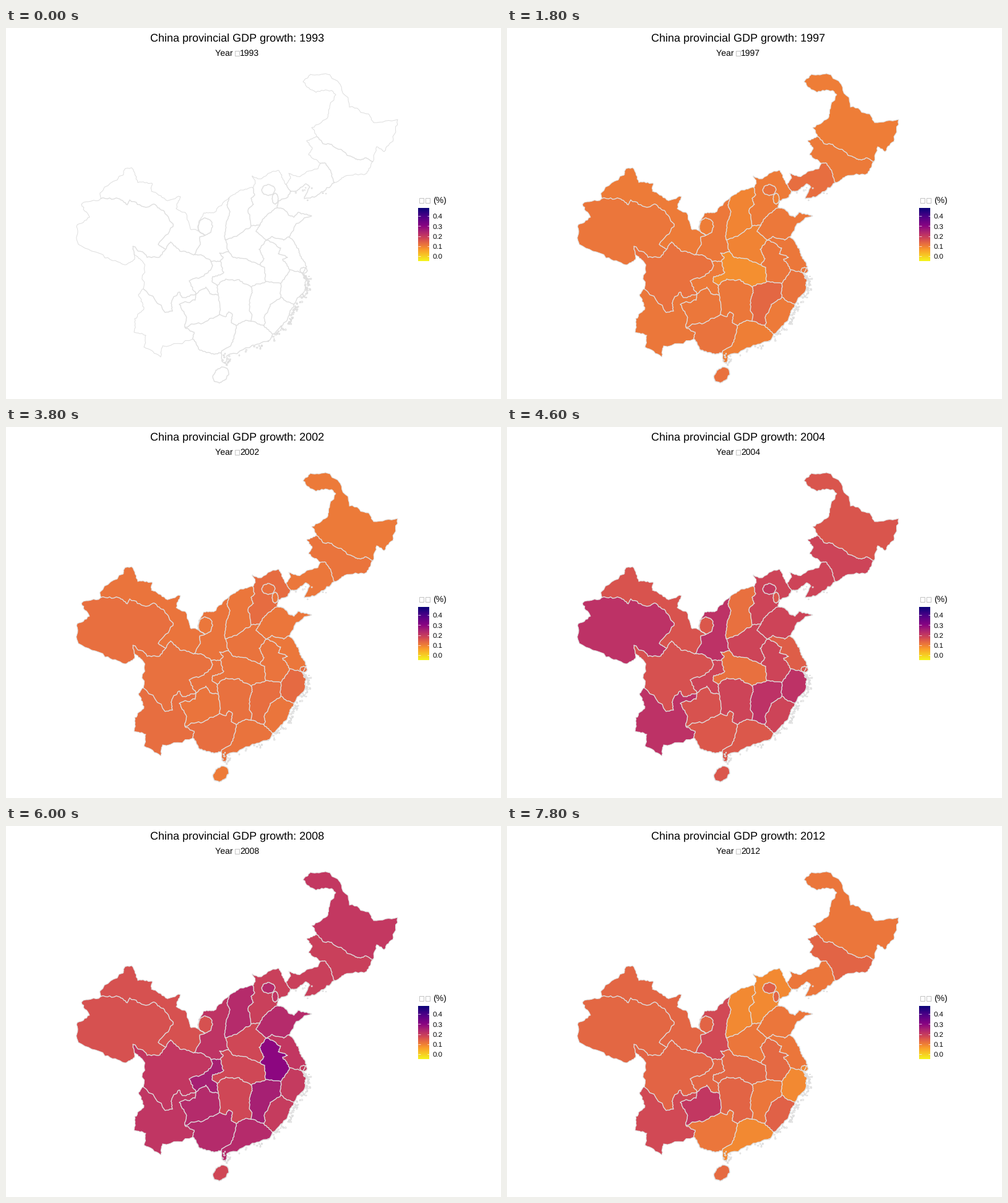
Write a matplotlib script that moves like this. It is 800 by 600 pixels and loops after 8000 ms.

```python
import numpy as np
import matplotlib.pyplot as plt
from matplotlib.animation import FuncAnimation
from matplotlib.collections import LineCollection, PolyCollection
from matplotlib.colors import LinearSegmentedColormap
from matplotlib.patches import Rectangle

W, H, DPI = 800, 600, 100
FRAMES, STEP_MS = 40, 200
BORDER = "#dedede"
plt.rcParams.update({"font.family": "Liberation Sans", "text.hinting": "none",
                     "text.kerning_factor": 6})
rng = np.random.default_rng(7)

# Points where borders meet.
NODES = dict(
    a=(503, 176), b=(593, 216), c=(508, 219), d=(531, 250), e=(452, 253), f=(461, 264), g=(399, 258),
    h=(438, 291), i=(411, 318), j=(396, 320), k=(361, 274), l=(354, 342), m=(310, 328), n=(303, 367),
    o=(331, 377), p=(346, 377), q=(360, 362), r=(153, 276), s=(258, 358), t=(207, 366), u=(222, 422),
    v=(307, 430), w=(343, 432), x=(341, 416), y=(302, 503), z=(289, 484), A=(345, 463), B=(372, 481),
    C=(348, 525), D=(396, 419), E=(396, 474), F=(410, 383), G=(420, 410), H=(421, 343), I=(459, 391),
    J=(457, 338), K=(444, 413), L=(479, 397), M=(466, 446), N=(444, 435), O=(417, 482), P=(431, 495))

# Each border: the two sides, its end nodes, then the bends between as x, y.
BORDERS = [
    ("HL out", "ab", 494, 161, 519, 146, 523, 130, 533, 108, 526, 101, 501, 104, 480, 87, 492, 75, 520, 75,
     540, 91, 555, 128, 586, 139, 594, 153, 633, 148, 626, 180, 611, 200, 599, 192),
    ("HL JL", "ab", 512, 187, 526, 188, 556, 207, 568, 213, 582, 210),
    ("JL out", "ac", 486, 182, 495, 195, 489, 205),
    ("JL LN", "cd", 515, 218, 525, 232),
    ("JL out", "db", 547, 240, 583, 235),
    ("LN out", "ce", 503, 228, 470, 240, 457, 235, 460, 243),
    ("LN HE", "ef"),
    ("LN sea", "fd", 468, 264, 484, 252, 491, 257, 482, 276, 507, 268),
    ("HE out", "eg", 447, 243, 440, 230, 408, 244, 398, 239, 403, 251),
    ("HE sea", "fh", 455, 274, 440, 279),
    ("HE SD", "hi", 418, 306),
    ("HE SX", "gj", 402, 270, 396, 276, 400, 285, 392, 292),
    ("HE HA", "ji"),
    ("SX out", "gk", 379, 262),
    ("SX SN", "kl", 357, 286, 362, 297, 355, 320),
    ("SX HA", "lj", 375, 335),
    ("SN out", "km", 335, 299, 320, 299, 312, 312),
    ("SN GS", "mn", 322, 335, 313, 338, 314, 347),
    ("SN SC", "no", 312, 367),
    ("SN CQ", "op"),
    ("SN HB", "pq", 351, 371, 345, 364),
    ("SN HA", "ql"),
    ("GS out", "rm", 152, 267, 189, 238, 192, 228, 203, 226, 213, 250, 236, 251, 235, 264, 258, 278,
     282, 273, 275, 292, 291, 300, 298, 325),
    ("GS QH", "rs", 182, 276, 196, 286, 200, 278, 226, 290, 240, 285, 256, 297, 270, 321, 246, 350),
    ("GS SC", "sn", 266, 346, 281, 361),
    ("QH out", "rt", 122, 285, 135, 306, 114, 321, 117, 350, 160, 372, 192, 383, 208, 374),
    ("QH SC", "ts", 205, 353, 228, 371, 247, 371),
    ("SC out", "tu", 221, 378),
    ("SC YN", "uv", 257, 460, 269, 458, 268, 441, 280, 427, 285, 436),
    ("SC CQ", "ov", 334, 384, 320, 401, 296, 409),
    ("CQ GZ", "vw", 323, 419, 330, 430),
    ("CQ HN", "wx"),
    ("CQ HB", "xp", 333, 410, 334, 402, 352, 395),
    ("YN out", "uy", 214, 432, 223, 452, 208, 470, 207, 492, 226, 497, 223, 516, 250, 532, 253, 514),
    ("YN GZ", "vz", 306, 440, 280, 447, 291, 466),
    ("YN GX", "zy", 304, 492),
    ("GX GZ", "zA", 319, 477, 337, 468),
    ("GZ HN", "wA"),
    ("GX HN", "AB", 355, 467, 360, 459, 366, 463, 364, 476),
    ("GX GD", "BC", 371, 492, 364, 512),
    ("GX sea", "yC", 311, 519, 332, 527),
    ("HN HB", "xD", 355, 406, 377, 407),
    ("HN JX", "DE", 398, 428, 393, 447),
    ("HN GD", "BE", 390, 473),
    ("HB HA", "qF", 367, 371, 390, 374),
    ("HB AH", "FG", 418, 387),
    ("HB JX", "DG"),
    ("HA AH", "FH", 417, 373, 409, 358),
    ("HA SD", "iH", 404, 329),
    ("AH JS", "HI", 444, 356, 440, 365, 455, 371, 447, 374),
    ("SD JS", "HJ", 430, 337, 449, 343),
    ("AH ZJ", "IK", 455, 399),
    ("AH JX", "GK"),
    ("SD sea", "hJ", 447, 292, 465, 306, 472, 298, 494, 304, 467, 320),
    ("JS sea", "JL", 473, 357, 475, 368, 486, 386),
    ("JS ZJ", "IL"),
    ("ZJ sea", "LM", 485, 404, 483, 424),
    ("ZJ FJ", "MN", 455, 443),
    ("ZJ JX", "KN"),
    ("JX FJ", "NO", 427, 447, 418, 466),
    ("JX GD", "EO", 402, 475),
    ("FJ GD", "OP"),
    ("FJ sea", "MP", 459, 460, 452, 475),
    ("GD sea", "PC", 427, 504, 398, 513, 357, 530, 355, 543, 349, 539),
]
# Small regions: centre, radii, tilt.
BLOBS = {"NX": (322, 321, 12, 14, 0), "BJ": (424, 262, 11, 9, 0), "TJ": (435, 276, 5, 9, 0),
         "SH": (481, 392, 6, 5, 0), "HI": (347, 561, 15, 11, -0.8)}

# Growth in percent: the usual value, then regions that stand out.
GROWTH = {
    1994.0: (33, {}),
    1995.4: (22, {9.5: "HB", 14: "SX", 17.5: "TJ GD HA", 19.3: "HL NX GS", 24.5: "LN BJ GZ GX ZJ",
                  27: "HI", 29.5: "JX"}),
    1998.0: (7.5, {}),
    1999.8: (11.5, {6.5: "JL GX", 9: "SC CQ YN AH JX", 14: "HL LN SN SH ZJ HA", 17: "GD", 20: "BJ"}),
    2002.0: (11, {}),
    2004.2: (15.5, {12: "SX HB", 18: "JL LN HE HN HA SD FJ AH CQ", 20: "BJ", 21.7: "QH SN YN ZJ JX"}),
    2007.6: (20.7, {16.3: "QH GS NX", 17.7: "HA HB HN HI", 19: "JL LN HE", 23.2: "SX SD GD GX GZ BJ",
                    25.5: "JX CQ", 30: "AH"}),
    2009.0: (10, {}),
    2010.0: (21.5, {9.5: "LN", 16: "HL SD SH BJ", 18: "GD GZ YN JL HE HA", 23.8: "HB SN JX", 25.3: "SX HI"}),
    2012.0: (13.5, {8.7: "SX HE GD ZJ SH", 11.2: "LN GX JX SD JS HA HL", 17.3: "YN SN", 20.5: "GZ"}),
}
LOW, HIGH = -5, 48
STOPS = {-5: "#f4f51e", 6: "#fa9f2a", 9.5: "#f08234", 12: "#e8703f", 15.5: "#da564c", 18: "#cd4458",
         22: "#bb3067", 25: "#a82272", 30: "#8b0481", 40: "#4b0087", 48: "#0a0478"}
CMAP = LinearSegmentedColormap.from_list(
    "growth", [((v - LOW) / (HIGH - LOW), c) for v, c in STOPS.items()], 512)


def shade(v):
    return CMAP(np.clip((v - LOW) / (HIGH - LOW), 0, 1))


def roughen(pts, levels=3):
    """Split each segment and push the midpoint sideways, more so at fine scale."""
    pts = np.array(pts, float)
    for k in range(levels):
        d = np.diff(pts, axis=0)
        side = np.column_stack([-d[:, 1], d[:, 0]])
        push = rng.uniform(-1, 1, (len(d), 1)) * 0.06 * 2 ** k
        fine = np.empty((2 * len(pts) - 1, 2))
        fine[::2], fine[1::2] = pts, pts[:-1] + d / 2 + side * push
        pts = fine
    return pts


def ellipse(cx, cy, rx, ry, tilt=0, n=9):
    a = np.linspace(0, 2 * np.pi, n)
    u, v = rx * np.cos(a), ry * np.sin(a)
    c, s = np.cos(tilt), np.sin(tilt)
    ring = np.column_stack([cx + u * c - v * s, cy + u * s + v * c])
    ring[-1] = ring[0]
    return ring


def chain(arcs):
    """Join arcs end to end into one ring."""
    ring, rest = arcs[0], list(arcs[1:])
    while rest:
        tip = ring[-1]
        i = next(i for i, arc in enumerate(rest) if any(np.array_equal(arc[k], tip) for k in (0, -1)))
        arc = rest.pop(i)
        ring = np.vstack([ring, arc[1:] if np.array_equal(arc[0], tip) else arc[-2::-1]])
    return ring


def islets(coast, n, spread=1.8):
    """Tiny ragged rings scattered just off a coast."""
    spots = coast[rng.integers(0, len(coast), n)] + (4, 3) + rng.normal(0, spread, (n, 2))
    return [roughen(ellipse(*spot, *rng.uniform(0.5, 1.6, 2), n=6), 1) for spot in spots]


arcs = [(sides.split(), roughen([NODES[ends[0]], *zip(xy[::2], xy[1::2]), NODES[ends[1]]]))
        for sides, ends, *xy in BORDERS]
regions = dict.fromkeys(s for sides, _ in arcs for s in sides if s not in ("out", "sea"))
for name in regions:
    regions[name] = chain([pts for sides, pts in arcs if name in sides])
blobs = {name: roughen(ellipse(*b)) for name, b in BLOBS.items()}
regions.update(blobs)
names = list(regions)

islands = []
for sides, pts in arcs:
    if "sea" in sides:
        islands += islets(pts, {"ZJ": 60, "FJ": 50, "GD": 32, "LN": 8}.get(sides[0], 0))

years = list(GROWTH)
growth = np.array([[usual] * len(names) for usual, _ in GROWTH.values()], float)
growth += rng.normal(0, 0.5, growth.shape)
for row, (_, special) in zip(growth, GROWTH.values()):
    for value, group in special.items():
        row[[names.index(n) for n in group.split()]] = value


def fills(year):
    v = np.array([np.interp(year, years, g) for g in growth.T])
    fade = min(year - 1993, 1)  # the first year has no data
    return 1 - fade * (1 - shade(v)[:, :3])


def px(n):
    return n * 72 / DPI


fig = plt.figure(figsize=(W / DPI, H / DPI), dpi=DPI, facecolor="white")
ax = fig.add_axes([0, 0, 1, 1])
ax.axis("off")

land = PolyCollection(list(regions.values()), edgecolors="none")
ax.add_collection(land)


def strokes(lines, width):
    ax.add_collection(LineCollection(lines, colors=BORDER, linewidths=px(width)))


strokes([pts for sides, pts in arcs if "out" in sides], 1)
strokes([pts for sides, pts in arcs if "out" not in sides] + list(blobs.values()), 1.4)
strokes(islands, 1)


def label(x, y, text, size):
    return ax.text(x, y, text, fontsize=px(size), color="black", ha="left", va="baseline")


def blank_glyph(x, y):
    ax.add_patch(Rectangle((x, y), 7, 8.5, fill=False, edgecolor="#b4b4b4", linewidth=px(0.8)))


title = label(233, 21, "", 18)
label(338, 45, "Year", 14)
blank_glyph(370, 36.5)
subtitle = label(378, 45, "", 14)

blank_glyph(667.5, 274.5)
blank_glyph(678, 274.5)
label(690.5, 283, "(%)", 14)
bar = np.linspace(HIGH, LOW, 256)[:, None]
ax.imshow(shade(bar), extent=(666, 684, 377, 291), aspect="auto", interpolation="bilinear")
for i in range(5):
    y = 369 - 16.2 * i
    label(690, y + 4, f"{i / 10:.1f}", 11.5)
    for x in (666, 680.5):
        ax.plot([x, x + 3.5], [y, y], color="white", linewidth=px(0.7), solid_capstyle="butt")
ax.set(xlim=(0, W), ylim=(H, 0))


def draw(i):
    year = 1993 + i * 19 / (FRAMES - 1)
    shown = int(year + 0.5)
    land.set_facecolor(fills(year))
    title.set_text(f"China provincial GDP growth: {shown}")
    subtitle.set_text(str(shown))
    return land, title, subtitle


anim = FuncAnimation(fig, draw, frames=FRAMES, interval=STEP_MS, repeat=True, repeat_delay=0)
plt.show()
```
